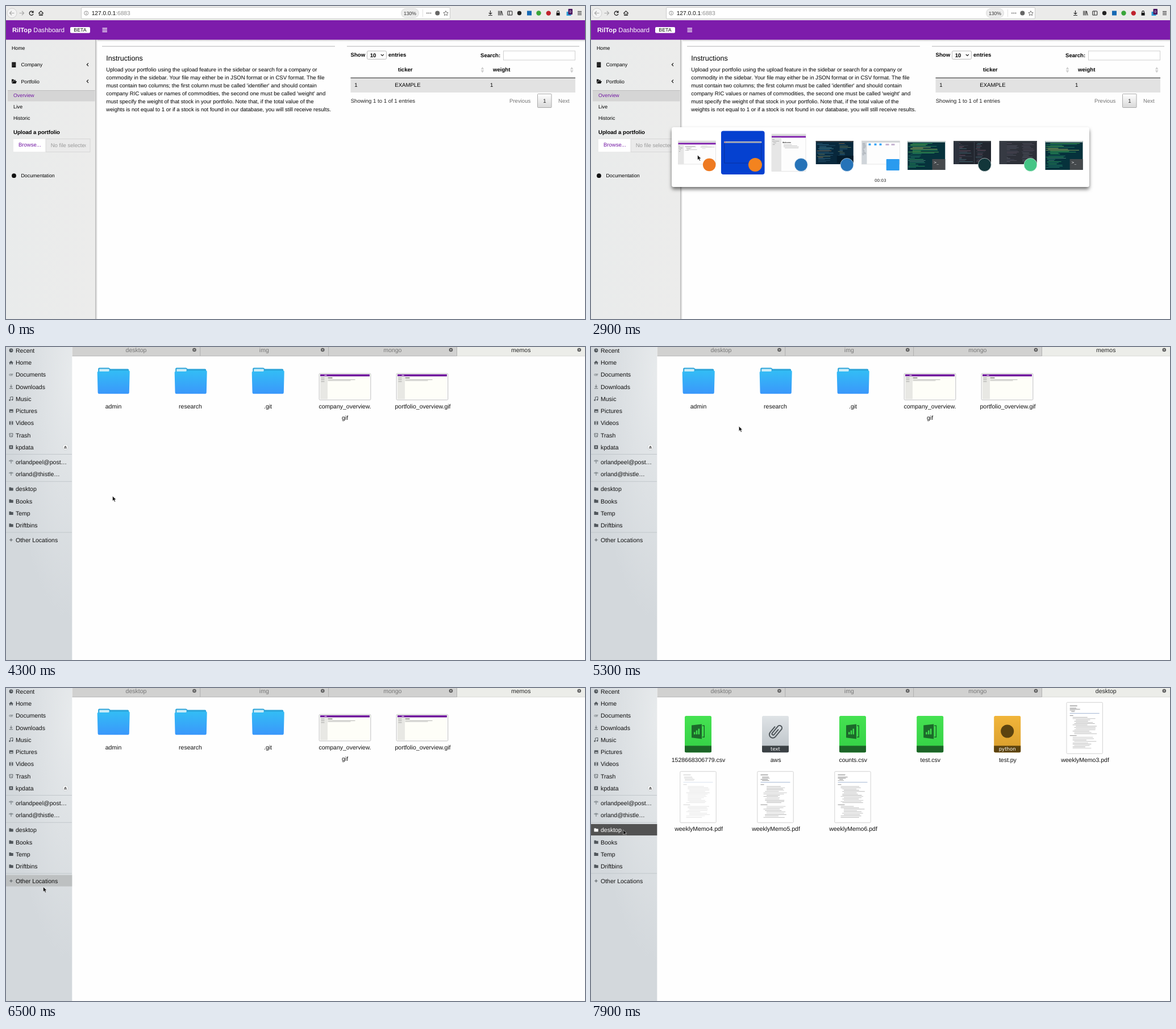
An HTML page for the animation above (8000 ms loop, 1019 px wide and 550 px high).

```html
<!DOCTYPE html>
<html lang="en">
<head>
<meta charset="utf-8">
<title>Portfolio dashboard</title>
<style>
html, body { margin: 0; width: 100%; height: 100%; overflow: hidden; background: #fefefe; }
svg { display: block; width: 1019px; height: 550px; }
text { font-family: "Liberation Sans", Arial, sans-serif; text-rendering: geometricPrecision; white-space: pre; }
.dv { font-family: "DejaVu Sans", sans-serif; }
</style>
</head>
<body>
<svg id="stage" viewBox="0 0 1019 550" xmlns="http://www.w3.org/2000/svg"></svg>
<script>
const LOOP = 8000, OPEN = 2900, FILES = 4300, CLICK = 7300;

// ---- drawing helpers: each returns markup ----
const R = (x, y, w, h, fill, more = '') => `<rect x="${x}" y="${y}" width="${w}" height="${h}" fill="${fill}" ${more}/>`;
const C = (x, y, r, fill, more = '') => `<circle cx="${x}" cy="${y}" r="${r}" fill="${fill}" ${more}/>`;
const P = (d, fill, more = '') => `<path d="${d}" fill="${fill}" ${more}/>`;
const L = (d, color, width = 1) => P(d, 'none', `stroke="${color}" stroke-width="${width}"`);
const G = (inner, more = '') => `<g ${more}>${inner}</g>`;
// y is the middle of the capitals
const T = (x, y, s, size, fill = '#000', more = '') =>
  `<text x="${x}" y="${(y + size * 0.35).toFixed(2)}" font-size="${size}" fill="${fill}" ${more}>${s}</text>`;
const MID = 'text-anchor="middle"', BOLD = 'font-weight="bold"';
const grad = (id, a, b, dir = 'x2="0" y2="1"') =>
  `<linearGradient id="${id}" ${dir}><stop offset="0" stop-color="${a}"/><stop offset="1" stop-color="${b}"/></linearGradient>`;

function random(seed) {
  return () => (seed = (seed * 16807) % 2147483647) / 2147483647;
}

// rows of short strokes that read as tiny text
function scribble(x, y, w, h, colors, step, seed, thick = 0.7, least = 0.25) {
  const rnd = random(seed * 7919 + 11);
  let s = '';
  for (let v = y; v < y + h; v += step) {
    const inset = Math.floor(rnd() * 3) * w * 0.06;
    const len = (w - inset) * (least + rnd() * (0.95 - least));
    s += R((x + inset).toFixed(1), v.toFixed(1), len.toFixed(1), thick, colors[Math.floor(rnd() * colors.length)]);
  }
  return s;
}

const defs = `<defs>
${grad('side', '#e9ebeb', '#ececeb', 'x2="1" y2="0"')}
${grad('edge', '#b4b4b4', '#fefefe', 'x2="1" y2="0"')}
${grad('under', '#d0d0d0', '#fefefe')}
${grad('btn', '#ffffff', '#d8d8d8')}
${grad('fold', '#33bdf5', '#3a97fb')}
${grad('csv', '#45e251', '#33cf45')}
${grad('txt', '#dfe3e6', '#bac1c6')}
${grad('py', '#f1b53a', '#d89d2c')}
<radialGradient id="places" gradientUnits="userSpaceOnUse" cx="0" cy="0" r="1" gradientTransform="translate(116 50) scale(110 430)">
<stop offset="0" stop-color="#e7eaec"/><stop offset="1" stop-color="#d3d8dc"/></radialGradient>
<filter id="drop" x="-5%" y="-20%" width="110%" height="150%"><feDropShadow dx="0" dy="4" stdDeviation="3" flood-opacity=".55"/></filter>
<clipPath id="field"><rect x="71" y="234" width="69.5" height="22"/></clipPath>
</defs>`;

// ---- browser page ----
function toolbar() {
  const ink = '#2b2b2b';
  return R(0, 0, 1019, 25, '#ebebea') +
    C(10.5, 12.5, 8.5, '#f3f3f3', 'stroke="#c6c6c6" stroke-width=".8"') +
    L('M14.5 12.5H7M10 9L6.5 12.5L10 16', '#a6a6a6', 1.2) +
    L('M23.5 12.5H31M28 9L31.5 12.5L28 16', '#a6a6a6', 1.2) +
    L('M47.4 10.5A3.5 3.5 0 1 0 48 14', ink, 1.3) + P('M48.6 8V12.2H44.4Z', ink) +
    L('M57.3 13L61.5 8.8L65.7 13M58.8 12.3V16.5H64.2V12.3', ink, 1.2) + R(60.8, 13.3, 1.6, 3, ink) +
    R(132.5, 2.5, 649, 20, '#fff', 'rx="1.5" stroke="#cbcbcb"') +
    C(141.2, 12.5, 3.5, 'none', 'stroke="#777" stroke-width=".8"') +
    R(140.8, 11.8, 0.9, 2.7, '#777') + R(140.8, 10.3, 0.9, 0.9, '#777') +
    T(150.7, 12.5, '127.0.0.1<tspan fill="#8c8c8c">:6883</tspan>', 10.2, '#111') +
    R(695.5, 4.5, 31, 16, '#ececec', 'rx="8" stroke="#d6d6d6" stroke-width=".8"') +
    T(711, 12.7, '130%', 8.6, '#333', MID) +
    L('M733.5 6V19', '#d8d8d8', 0.8) +
    [741, 744.2, 747.4].map(x => C(x, 12.5, 1, '#666')).join('') +
    C(759.3, 12.6, 4, '#666') +
    P('M774 8.6L775.3 11.3L778.2 11.7L776.1 13.7L776.6 16.6L774 15.2L771.4 16.6L771.9 13.7L769.8 11.7L772.7 11.3Z', 'none', 'stroke="#666" stroke-width=".9"') +
    L('M852.5 8V14.5M849.8 11.8L852.5 14.5L855.2 11.8M849 16.5H856', ink, 1.2) +
    L('M866.8 8.5V16.5M869 8.5V16.5M871.2 8.5V16.5M872.2 9L874.2 16.5', ink, 1.1) +
    R(882.8, 9, 8, 7, 'none', `rx="1" stroke="${ink}" stroke-width="1.1"`) + L('M886 9V16', ink, 1) +
    C(903.5, 12.5, 3.7, '#222') + R(917, 8.5, 8, 8, '#1669b4') +
    C(937.5, 12.5, 4.2, '#3aa63a') + C(954.8, 12.6, 4.2, '#c0222e') +
    R(968.6, 12, 6, 4.6, '#111') + L('M969.8 12V10.4A1.8 1.8 0 0 1 973.4 10.4V12', '#111', 1.1) +
    R(986.5, 10, 8, 7, '#2c9fd8') + R(989.5, 5, 7.5, 10, '#4a1560', 'rx="1"') +
    T(993.2, 10, '0', 6, '#fff', MID) +
    [9.6, 12.4, 15.2].map(y => R(1006, y - 0.5, 7, 1.1, ink)).join('');
}

function sidebar() {
  const left = 'M145 100.3L142.3 103L145 105.7';
  return R(0, 59, 157.5, 491, 'url(#side)') + R(157, 59, 4, 491, 'url(#edge)') +
    T(10, 73.5, 'Home', 8.8) +
    R(10.3, 98.7, 7, 9.2, '#111') + [100.4, 102.4, 104.4].map(y => [12, 14.8].map(x => R(x, y, 0.9, 0.9, '#999')).join('')).join('') +
    T(26.5, 103.3, 'Company', 8.8) + L(left, '#111', 1.1) +
    P('M10 136V128.8H13L14 130H17V131.4H12.2Z', '#111') + P('M12.7 132H19L17.2 136.3H10.6Z', '#111') +
    T(26.5, 132.5, 'Portfolio', 8.8) + G(L(left, '#111', 1.1), 'transform="translate(0 29.3)"') +
    R(3, 148, 153.5, 19.5, '#d5d5d5') + R(3, 148, 153.5, 1, '#bdbdbd') +
    T(13, 157, 'Overview', 8.8, '#7216a3') + T(13, 177, 'Live', 8.8) + T(13, 197, 'Historic', 8.8) +
    T(13, 222, 'Upload a portfolio', 9.58, '#000', BOLD) +
    R(13.5, 233.5, 134.5, 23, '#eaeaea', 'stroke="#d3d3d3" stroke-width=".8"') +
    R(13, 233.5, 57, 23, '#fff') + L('M70 233.5V256.5', '#d3d3d3', 0.8) +
    T(22, 244, 'Browse...', 9.5, '#7216a3') +
    G(T(78.7, 244.5, 'No file selected', 9.58, '#9a9a9a'), 'clip-path="url(#field)"') +
    C(14, 298.2, 3.9, '#111') + T(26.5, 298.3, 'Documentation', 8.8);
}

function content() {
  const para = ['Upload your portfolio using the upload feature in the sidebar or search for a company or',
    'commodity in the sidebar. Your file may either be in JSON format or in CSV format. The file',
    "must contain two columns; the first column must be called 'identifier' and should contain",
    "company RIC values or names of commodities, the second one must be called 'weight' and",
    'must specify the weight of that stock in your portfolio. Note that, if the total value of the',
    'weights is not equal to 1 or if a stock is not found in our database, you will still receive results.'];
  const sort = x => P(`M${x - 2.8} 111.5L${x} 107L${x + 2.8} 111.5ZM${x - 2.8} 113L${x} 117.5L${x + 2.8} 113Z`, '#cfcfcf');
  const S = 9.58;
  return R(161, 59, 858, 4, 'url(#under)') +
    R(169, 70, 410, 1.6, '#cfcfd0') + R(600, 70, 409, 1.6, '#cfcfd0') +
    T(176.3, 91.2, 'Instructions', 12.6) +
    para.map((s, i) => T(176.3, 112 + i * 13.96, s, S)).join('') +
    T(606.6, 85.8, 'Show', S, '#000', BOLD) +
    R(635.5, 79, 34, 14.5, '#fbfbfb', 'rx="2" stroke="#b5b5b5" stroke-width=".9"') +
    T(640.8, 86.2, '10', S, '#000', BOLD) + L('M659.8 85L662.3 87.4L664.8 85', '#222', 1.1) +
    T(673, 85.8, 'entries', S, '#000', BOLD) +
    T(835, 86.3, 'Search:', S, '#000', BOLD) +
    R(875.5, 79, 126, 16, '#fff', 'stroke="#cacaca" stroke-width=".9"') +
    T(690, 112, 'ticker', S, '#000', BOLD) + T(857, 112, 'weight', S, '#000', BOLD) + sort(838.5) + sort(995.7) +
    R(606.5, 126, 395.5, 26, '#e2e2e2') + R(606.5, 125.8, 395.5, 1, '#222') +
    T(613.3, 139, '1', S) + T(684.3, 139, 'EXAMPLE', S) + T(852, 139, '1', S) +
    T(606.7, 166.2, 'Showing 1 to 1 of 1 entries', S, '#222') +
    T(886, 166.2, 'Previous', S, '#747474') + T(972, 166.2, 'Next', S, '#747474') +
    R(935.5, 154.5, 24.5, 24, 'url(#btn)', 'rx="1" stroke="#a2a2a2" stroke-width=".9"') +
    T(947.8, 166.2, '1', S, '#222', MID);
}

const page = () => R(0, 0, 1019, 550, '#fefefe') + toolbar() + content() + sidebar() +
  R(0, 25, 1019, 34.3, '#7d1cab') +
  T(11, 42, 'RilTop', 11.2, '#fff', BOLD) + T(48.3, 42, 'Dashboard', 11.2, '#fff') +
  R(113, 37, 35, 10.5, '#fff', 'rx="2"') + T(130.5, 42.3, 'BETA', 8.8, '#111', MID) +
  [39.2, 42.2, 45.2].map(y => R(169.5, y - 0.7, 8.5, 1.4, '#fff')).join('');

// ---- window switcher ----
const titles = ['', '00:03', '~/memos/dashboard - Shiny - RilTop Dashboard',
  '~/memos/dashboard - master - RilTop Dashboard Editor', 'memos'];
const center = i => 186.5 + 80.75 * i;

function thumb(i) {
  const x = center(i) - 33;
  const code = (bg, colors, h, seed) => R(x, 237, 66, h, bg) + R(x, 237, 66, 2, '#3c4248') +
    scribble(x + 2, 241, 34, h - 7, colors, 1.9, seed) + scribble(x + 39, 241, 24, h - 9, colors, 2.4, seed + 5);
  const term = seed => R(x, 237, 66, 51, '#06323c') + R(x, 237, 66, 2.5, '#c9d4d2') +
    scribble(x + 1, 241, 64, 20, ['#2f9c5c', '#4cab52', '#20795e', '#8da85a'], 1.7, seed, 0.9) +
    scribble(x + 1, 263, 38, 22, ['#25836a', '#30a25c', '#4b8f7a'], 2, seed + 3, 0.8);
  const web = (tx, ty, w, h, rail) => R(tx, ty, w, h, '#fdfdfd', 'stroke="#ccc" stroke-width=".5"') +
    R(tx, ty, w, 3.5, '#dadada') + R(tx, ty + 3.5, w, 2.8, '#7d1cab') + R(tx, ty + 6.3, rail, h - 6.3, '#e6e6e6') +
    scribble(tx + 1, ty + 9, rail - 2, 12, ['#888'], 3, 4, 0.6);
  switch (i) {
    case 0: return web(x, 237, 66, 41, 10) + scribble(x + 12, 246, 23, 9, ['#999'], 1.5, 2, 0.5) +
      R(x + 39, 247, 25, 1.6, '#ddd') + scribble(x + 39, 245, 25, 7, ['#bbb'], 2.5, 6, 0.5);
    case 1: return `<rect id="frame" x="${x + 0.5}" y="238.5" width="65" height="37.5" stroke="#777" stroke-width=".8"/>` +
      R(x, 238, 66, 2.6, '#c9c9c9') + R(x + 1, 238.6, 1.5, 1.5, '#d0424a') + R(x + 3, 239, 62, 0.8, '#8b8b8b');
    case 2: return web(318, 225, 60, 65.5, 17) + T(337, 240, 'Welcome', 3.4, '#222', BOLD) +
      scribble(337, 243.5, 34, 6, ['#aaa'], 1.9, 9, 0.6);
    case 3: return code('#08283c', ['#3f7fa0', '#4f93a8', '#7d8f68', '#2a5874', '#a27a55'], 41, 21) + R(x + 37, 263, 29, 13, '#041c2c');
    case 4: return R(x, 237, 67, 41, '#fdfdfd', 'stroke="#ccc" stroke-width=".5"') + R(x, 237, 67, 3, '#d3d6d8') +
      R(x, 240, 9, 38, '#d0d5da') + scribble(x + 1, 241, 7, 22, ['#808890'], 2, 8, 0.6) +
      [12, 22, 31].map(d => R(x + d, 241.5, 4, 3.4, '#38a5f8', 'rx=".5"')).join('') +
      [42, 52].map(d => R(x + d, 242, 6, 3, '#c6b5d2')).join('');
    case 5: return term(31);
    case 6: return code('#22262f', ['#4b5568', '#7e5d72', '#4d7a86', '#3b434f'], 41, 41) + R(x, 239, 10, 39, '#2d333e') + R(x + 36, 239, 0.7, 39, '#4a525e');
    case 7: return code('#2d3038', ['#545966', '#656a77', '#44495a', '#5d5668'], 41, 51) + R(x, 239, 13, 39, '#363a43');
    default: return term(61);
  }
}

function badge(i) {
  const x = center(i) + 21.7, y = 279;
  const prompt = () => R(x - 11.5, y - 10, 23, 19, '#45494c') + T(x - 9, y - 4, '&gt;_', 6.5, '#e8e8e8', 'class="dv"');
  const disc = c => C(x, y, 11.5, c, 'stroke="#fff" stroke-opacity=".55" stroke-width="1"');
  return [() => C(x, y, 11.3, '#ee7a22'), () => C(x, y, 12, '#f3831f'), () => disc('#2673b8'), () => disc('#2673b8'),
    () => R(x - 11.5, y - 10, 23, 20, '#2a9bef', 'rx="1"'), prompt, () => disc('#12363a'), () => disc('#46c586'), prompt][i]();
}

function switcher() {
  let s = R(142, 213, 735, 105, '#fff', 'rx="4" filter="url(#drop)"');
  for (let i = 0; i < 9; i++) {
    s += `<rect class="slot" x="${center(i) - 38.3}" y="219.5" width="76.6" height="76.5" rx="4" fill="none"/>` + thumb(i) + badge(i);
  }
  return s + `<text id="caption" class="dv" x="509.3" y="309.4" font-size="7.2" fill="#222" ${MID}></text>`;
}

// ---- file manager ----
const rows = [['Recent', 6], ['Home', 27.3], ['Documents', 48.5], ['Downloads', 69.8], ['Music', 91], ['Pictures', 112.3],
  ['Videos', 133.5], ['Trash', 154.8], ['kpdata', 176], ['orlandpeel@post…', 202], ['orland@thistle…', 223.3],
  ['desktop', 249.5], ['Books', 270.7], ['Temp', 292], ['Driftbins', 313.2], ['Other Locations', 339]];

function placeIcon(i, y) {
  const k = '#50565b';
  if (i > 10 && i < 15) return P(`M5.5 ${y - 3}H8.5L9.5 ${y - 2}H12.7V${y + 3}H5.5Z`, k, 'class="pic"');
  if (i === 9 || i === 10) return [4, 2.6, 1.2].map(r => L(`M${9 - r} ${y - r * 0.4}Q9 ${y - r * 1.2} ${9 + r} ${y - r * 0.4}`, '#80878c', 1)).join('') + C(9, y + 1.4, 1, '#80878c');
  return [
    () => C(9, y, 3.4, k) + L(`M9 ${y - 2}V${y}H11`, '#d5dade', 0.8),
    () => P(`M5 ${y + 0.4}L9 ${y - 3.4}L13 ${y + 0.4}H11.8V${y + 3.2}H9.8V${y + 1}H8.2V${y + 3.2}H6.2V${y + 0.4}Z`, k),
    () => L(`M12.5 ${y - 1}H7A1.3 1.3 0 0 0 7 ${y + 1.6}H11.5M8 ${y + 0.3}H12`, '#80878c', 0.9),
    () => L(`M9 ${y - 3.5}V${y + 1}M6.8 ${y - 1}L9 ${y + 1.2}L11.2 ${y - 1}M5.8 ${y + 3}H12.2`, k, 0.9),
    () => L(`M7.5 ${y + 2.4}V${y - 3}L12 ${y - 3.6}V${y + 1.6}`, k, 0.9) + C(6.6, y + 2.4, 1.3, k) + C(11, y + 1.8, 1.3, k),
    () => R(5.8, y - 2.8, 6.8, 5.8, k) + P(`M6.8 ${y + 2}L8.5 ${y - 0.5}L10 ${y + 1}L11 ${y}L12 ${y + 2}Z`, '#d5dade'),
    () => R(5.8, y - 3, 6.6, 6, k) + R(7.8, y - 2.4, 2.6, 2, '#d5dade') + R(7.8, y + 0.5, 2.6, 2, '#d5dade'),
    () => L(`M6 ${y - 2.8}H12L11.3 ${y + 3}H6.7ZM7.8 ${y - 0.8}L10.2 ${y + 1.6}`, k, 0.9),
    () => R(5.6, y - 3.3, 6.6, 6.6, k) + R(8, y - 1.6, 1.8, 3, '#d5dade')
  ][i]?.() ?? L(`M9 ${y - 2.7}V${y + 2.7}M6.3 ${y}H11.7`, k, 1);
}

function places() {
  return R(0, 0, 116.3, 550, 'url(#places)') +
    [188.5, 236.2, 325.8].map(y => R(0, y - 0.4, 116, 0.9, '#bfc5c9')).join('') +
    rows.map(([name, y], i) => `<rect class="row" x="0" y="${y - 10.4}" width="116.3" height="20" fill="none"/>` +
      placeIcon(i, y) + T(17, y + 0.2, name, 10.5, '#111', 'class="place"')).join('') +
    C(104.5, 176, 5, '#f3f4f5', 'stroke="#c3c8cb" stroke-width=".6"') + P('M102 176.4L104.5 173.4L107 176.4Z', '#555') + R(102, 177.3, 5, 1, '#555');
}

function tabs() {
  const mids = [229, 454.3, 680.3, 906.2];
  return R(116.5, 0, 677, 16, '#d1d1d0') + R(794, 0, 225, 16, '#ecede9') + R(116.5, 15.4, 677, 0.9, '#b4b4b4') +
    R(794, 15.4, 225, 0.9, '#d8d8d5') +
    [341.7, 567.6, 793.5].map(x => R(x - 0.4, 0, 0.9, 16, '#acacac')).join('') +
    ['desktop', 'img', 'mongo', 'memos'].map((s, i) => T(mids[i], 5.3, s, 10.5, i < 3 ? '#777' : '#222', MID + (i < 3 ? '' : ' id="tab"'))).join('') +
    [331.5, 557.3, 783, 1008.8].map(x => C(x, 5, 3.3, '#5c5c5c') + L(`M${x - 1.2} 3.8L${x + 1.2} 6.2M${x + 1.2} 3.8L${x - 1.2} 6.2`, '#e8e8e8', 0.8)).join('');
}

const label = (x, y, s) => T(x, y, s, 10.5, '#111', MID);

function memos() {
  const folder = x => P(`M${x - 27} 46V38.5Q${x - 27} 36.5 ${x - 25} 36.5H${x - 9}Q${x - 7.5} 36.5 ${x - 6.5} 37.8L${x - 5.7} 38.6H${x + 25}Q${x + 27} 38.6 ${x + 27} 40.6V46Z`, '#2ba3d9') +
    R(x - 25, 38.5, 17.5, 5, '#c9ecf8', 'rx="1"') +
    P(`M${x - 28.5} 45Q${x - 28.7} 43 ${x - 27} 43H${x - 9.5}Q${x - 8} 43 ${x - 7} 42.2Q${x - 6} 41.4 ${x - 4.5} 41.4H${x + 27}Q${x + 28.7} 41.4 ${x + 28.5} 43.4L${x + 27.6} 80Q${x + 27.4} 82.3 ${x + 25.5} 82.3H${x - 25.5}Q${x - 27.4} 82.3 ${x - 27.6} 80Z`, 'url(#fold)');
  const shot = x => R(x - 45.3, 46.5, 90.6, 46.5, '#fff', 'rx="1.5" stroke="#b9b9b9" stroke-width=".9"') +
    R(x - 43.5, 48, 87, 43.5, '#fefef8') + R(x - 43.5, 48, 87, 3.6, '#6f169c') + R(x - 36, 49.3, 4, 1, '#fff') +
    R(x - 43.5, 51.6, 13, 39.9, '#e8e8e4') + [54, 57, 60.5].map(y => R(x - 42, y, 6, 0.7, '#888')).join('') +
    R(x - 30, 53.8, 8, 1, '#333') + R(x - 30, 57, 48, 0.7, '#999') + R(x - 30, 58.7, 40, 0.7, '#aaa');
  return [189.2, 325.2, 461.2].map(folder).join('') + shot(596.5) + shot(732.5) +
    label(189, 104, 'admin') + label(324.5, 104, 'research') + label(461, 104, '.git') +
    label(596.5, 104, 'company_overview.') + label(596.5, 124, 'gif') + label(733.5, 104, 'portfolio_overview.gif');
}

function desktop() {
  const card = (x, fill, band, tag, inner) => R(x - 23.5, 49, 47, 64.3, `url(#${fill})`, 'rx="2.5"') +
    P(`M${x - 23.5} 101.5H${x + 23.5}V110.8Q${x + 23.5} 113.3 ${x + 21} 113.3H${x - 21}Q${x - 23.5} 113.3 ${x - 23.5} 110.8Z`, band) +
    T(x, 107.2, tag, 8.6, '#fff', MID + ' class="dv"') + inner;
  const sheet = x => card(x, 'csv', '#1c6427', '', P(`M${x - 11.5} 65.5L${x + 6.5} 63.5V89.5L${x - 11.5} 87.3Z`, '#1c6a2a') +
    P(`M${x + 7.5} 65.5H${x + 11.5}V87H${x + 7.5}V85.5H${x + 10}V67H${x + 7.5}Z`, '#1c6a2a') +
    [[-7.5, 4], [-3.7, 7], [0.1, 10]].map(([d, h]) => R(x + d, 81.5 - h, 2.5, h, '#3edb4c')).join(''));
  const clip = G(L('M-4 -4V5A4 4 0 0 0 4 5V-6A2.8 2.8 0 0 0 -1.6 -6V4A1.3 1.3 0 0 0 1.2 4V-4', '#4c5358', 1.3), 'transform="translate(324.7 76) rotate(40) scale(1.5)"');
  const faint = ['#a4a4a4', '#b4b4b4', '#999'];
  const doc = (x, y, seed, more = '') => R(x - 31.7, y, 63.4, 90, '#fff', 'rx="1.5" stroke="#cdcdcd" stroke-width=".9"') +
    G(R(x - 26, y + 5.6, 13, 0.9, '#666') + scribble(x - 26, y + 9.5, 22, 7, ['#777', '#999'], 2, seed, 0.8) +
      R(x - 26, y + 18.7, 52, 0.7, '#7f99c2') + R(x - 26, y + 22.7, 6, 0.8, '#777') +
      scribble(x - 21, y + 26, 46, 29, faint, 2.2, seed + 1, 0.7, 0.55) + R(x - 26, y + 58, 12, 0.8, '#777') +
      scribble(x - 21, y + 61, 44, 20, faint, 2.4, seed + 2, 0.7, 0.5), more);
  return sheet(188.5) + card(324.5, 'txt', '#3b4145', 'text', clip) + sheet(460.5) + sheet(596.7) +
    card(732.7, 'py', '#5c430f', 'python', C(732.7, 76, 11.5, '#5c430f')) +
    doc(868.7, 25.3, 3) + doc(188.5, 146.7, 8, 'id="late" opacity=".4"') + doc(324.5, 146.7, 14) + doc(460.5, 146.7, 19) +
    ['1528668306779.csv', 'aws', 'counts.csv', 'test.csv', 'test.py', 'weeklyMemo3.pdf'].map((s, i) => label(189 + 136.1 * i, 126, s)).join('') +
    [4, 5, 6].map((n, i) => label(189.5 + 136 * i, 247.3, `weeklyMemo${n}.pdf`)).join('');
}

// ---- assembly ----
document.getElementById('stage').innerHTML = defs + G(page(), 'id="page"') + G(switcher(), 'id="switch"') +
  G(R(0, 0, 1019, 550, '#fefefe') + G(memos(), 'id="memos"') + G(desktop(), 'id="desk"') + tabs() + places(), 'id="files"') +
  P('M0 0V8.6L2 6.8L3.5 10.1L5 9.4L3.6 6.3L6.2 6.1Z', '#111', 'id="arrow" stroke="#fff" stroke-width=".6" stroke-opacity=".85"');

const $ = id => document.getElementById(id);
const all = c => [...document.getElementsByClassName(c)];
const slots = all('slot'), bars = all('row'), names = all('place'), pics = all('pic');
const show = (id, on) => $(id).setAttribute('display', on ? 'inline' : 'none');

// pointer route: time, x, y
const route = [[500, 49, 444], [800, 90, 375], [1300, 154, 274], [1400, 187.5, 262], [4300, 187.5, 262], [4700, 236, 284],
  [5100, 270, 290], [5200, 268, 215], [5300, 260.3, 139.3], [5400, 228, 80], [5600, 130, 37], [5800, 66, 40], [6000, 52, 63],
  [6300, 58, 235], [6500, 65.5, 349.5], [6600, 66, 355], [6900, 63, 298], [7200, 56, 252], [7600, 57, 265],
  [7700, 57, 265], [7900, 56.7, 249.3], [LOOP, 56.7, 249.3]];

function pointer(t) {
  const i = route.findIndex(p => p[0] > t);
  const [t0, x0, y0] = route[i - 1], [t1, x1, y1] = route[i];
  const k = (t - t0) / (t1 - t0);
  return [x0 + (x1 - x0) * k, y0 + (y1 - y0) * k];
}

function pick(t) {
  const sel = t < 3600 ? 1 : t < 3900 ? 2 : t < 4100 ? 3 : 4;
  const fading = (t >= 3600 && t < 3700) || t >= 3900 ? sel - 1 : -1;
  slots.forEach((s, i) => s.setAttribute('fill', i === sel ? (sel === 1 ? '#0541d0' : '#1a55d8') : i === fading ? '#e3eaf1' : 'none'));
  $('frame').setAttribute('fill', sel === 1 ? '#0541d0' : '#fff');
  $('frame').setAttribute('stroke', sel === 1 ? '#0a2f94' : '#777');
  $('caption').textContent = titles[sel];
}

function browse(t, x, y) {
  const opened = t >= CLICK;
  show('memos', !opened);
  show('desk', opened);
  show('late', t >= 7800);
  $('tab').textContent = opened ? 'desktop' : 'memos';
  rows.forEach(([, mid], i) => {
    const active = opened && i === 11;
    const hover = !opened && x < 116 && Math.abs(y - mid) < 10.6;
    bars[i].setAttribute('fill', active ? '#525252' : hover ? '#bdc0c1' : 'none');
    names[i].setAttribute('fill', active ? '#fff' : '#111');
  });
  pics[0].setAttribute('fill', opened ? '#fff' : '#50565b');
}

function draw(ms) {
  const t = Math.floor((ms % LOOP) / 100) * 100;
  show('switch', t >= OPEN && t < FILES);
  show('files', t >= FILES);
  show('page', t < FILES);
  show('arrow', t >= 500);
  const [x, y] = t >= 500 ? pointer(t) : [0, 0];
  $('arrow').setAttribute('transform', `translate(${x.toFixed(1)} ${y.toFixed(1)})`);
  if (t >= FILES) browse(t, x, y);
  else if (t >= OPEN) pick(t);
}

let start;
function tick(now) {
  start ??= now;
  draw(now - start);
  requestAnimationFrame(tick);
}
draw(0);
requestAnimationFrame(tick);
</script>
</body>
</html>
```
